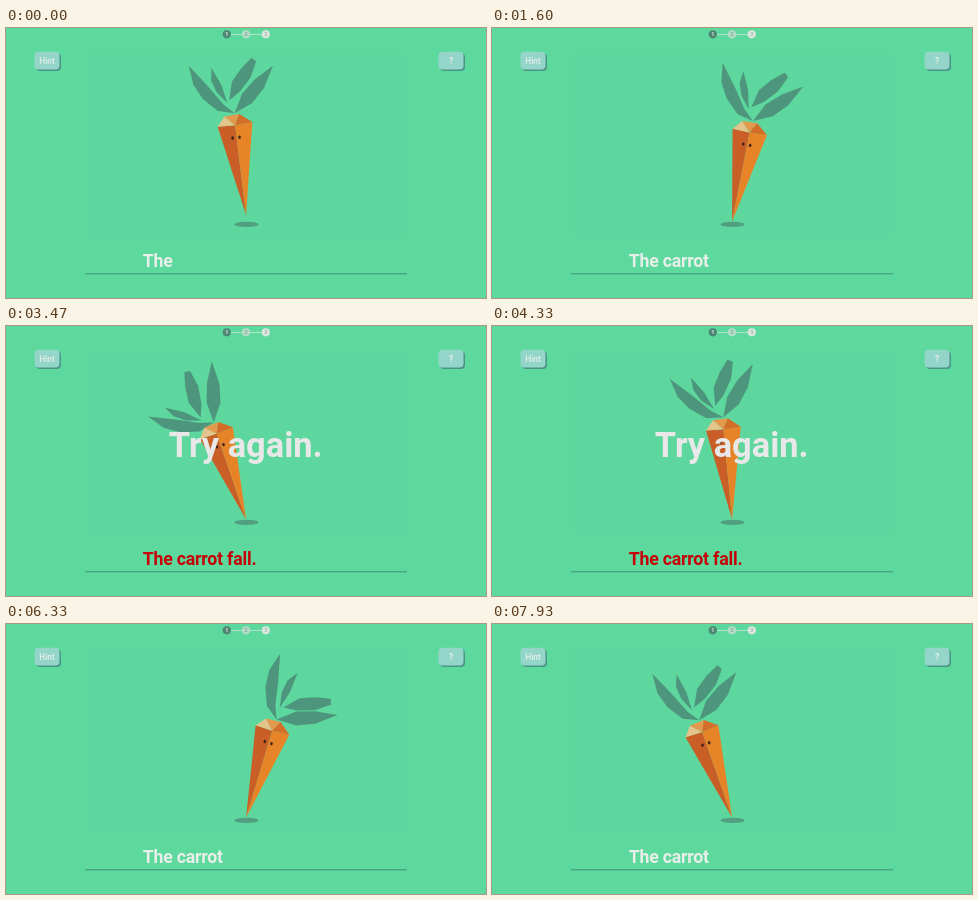
An HTML page that plays this animation: 480x270 px, repeating every 8 s.

```html
<!DOCTYPE html>
<html lang="en">
<head>
<meta charset="utf-8">
<title>Carrot</title>
<style>
  html, body { margin: 0; width: 100%; height: 100%; overflow: hidden; background: #5dd99e; }
  svg { display: block; width: 100%; height: 100%; }
  text { font-family: Roboto, Arial, sans-serif; font-weight: 700; fill: #e8eee9; white-space: pre; }
  .mid { text-anchor: middle; }
  #answer { font-size: 17.7px; letter-spacing: -0.2px; }
</style>
</head>
<body>
<svg viewBox="0 0 480 270">
  <rect x="80" y="24" width="321" height="185" fill="#5dd79d"/>

  <path d="M221 6.5H260" stroke="#b5e0ca"/>
  <g font-size="5.5" class="mid">
    <circle cx="220.8" cy="6.3" r="4.1" fill="#4d8672"/><text x="220.8" y="8.3">1</text>
    <circle cx="240" cy="6.3" r="4.1" fill="#b4dcc8"/><text x="240" y="8.3" style="fill:#82b09c">2</text>
    <circle cx="259.8" cy="6.3" r="4.1" fill="#dbe6df"/><text x="259.8" y="8.3" style="fill:#a5bdb0">3</text>
  </g>

  <g font-size="8.3" class="mid">
    <rect x="30" y="25.3" width="25" height="17.7" rx="4" fill="#4a9585"/>
    <rect x="28.5" y="23.8" width="25" height="17.7" rx="4" fill="#93d5c8"/>
    <text x="41" y="35.8" style="font-weight:500">Hint</text>
    <rect x="434" y="25.3" width="25" height="17.7" rx="4" fill="#4a9585"/>
    <rect x="432.5" y="23.8" width="25" height="17.7" rx="4" fill="#93d5c8"/>
    <text x="445" y="35.8">?</text>
  </g>

  <ellipse cx="240.5" cy="196.4" rx="12" ry="2.7" fill="#4f9f80"/>
  <g id="carrot">
    <g fill="#4d957c">
      <path class="leaf" d="M0 0L-10.5-13-13-32-10-49 0-66-.5-38-2-14Z"/>
      <path class="leaf" d="M-2-12L-6.5-27-6-40 0-51 1-31Z"/>
      <path class="leaf" d="M-9-10.5L-12-29-7.5-44-.5-58 5-56 4.5-39-1.5-22Z"/>
      <path class="leaf" d="M0 0L-6.5-20-5.5-39 0-61 7-38 7.3-19Z"/>
    </g>
    <path d="M-17.5-91L0-90.5 0 0Z" fill="#c95f27"/>
    <path d="M17.5-91.5L0-90.5 0 0Z" fill="#e88428"/>
    <path d="M-17.5-91L-9.5-100.5 0-90.5Z" fill="#e3c58c"/>
    <path d="M-9.5-100.5L5.5-101.2 0-90.5Z" fill="#e39a4c"/>
    <path d="M5.5-101.2L17.5-91.5 0-90.5Z" fill="#d46d27"/>
    <g fill="#42241a">
      <ellipse cx="-4" cy="-78" rx="1.3" ry="1.7"/>
      <ellipse cx="3" cy="-78" rx="1.3" ry="1.7"/>
    </g>
  </g>

  <text id="banner" class="mid" x="239.7" y="131" font-size="34.4" style="fill:#e8e8e8">Try again.</text>
  <text id="answer" x="136.7" y="239.3"></text>
  <path d="M79 245.8H401" stroke="#3f9074"/>
</svg>

<script>
const LOOP = 8000, SWAY = 5090;
const SENTENCE = "The carrot fall.";
const LEAF_ANGLES = [-37, -20, 24.5, 46];
const LEAF_FLEX = [0.97, 1.14, 1.18, 0.96];

// Sway poses: time, body lean, leaf flop, hop height
const poses = [
  [0, -7, 0, 6.4], [300, 3, -14, 4], [800, 16.5, -13, 0], [980, 17.5, 10, 0],
  [1240, 16.8, 24, 0], [1730, 8, -10, 0], [1980, -4, -10, 0], [2230, 5, 14, 0],
  [2400, 5.4, 24, 0], [2710, -14, 13, 0], [2840, -19.3, 11.5, 0], [3470, -19, -30, 0],
  [4000, -2, 0, 0], [4330, -5.5, -12, 0], [4450, -7, -13, 0], [4750, 0, 3, 0]
];

const carrot = document.getElementById("carrot");
const leaves = document.querySelectorAll(".leaf");
const banner = document.getElementById("banner");
const answer = document.getElementById("answer");

const clamp = (v, lo, hi) => Math.min(hi, Math.max(lo, v));

function poseKey(i) {
  const n = poses.length, [time, ...values] = poses[(i + n) % n];
  return [time + Math.floor(i / n) * SWAY, ...values];
}

// Smooth cyclic curve through the poses
function poseAt(time) {
  const i = poses.findLastIndex(p => p[0] <= time);
  const [a, b, c, d] = [-1, 0, 1, 2].map(k => poseKey(i + k));
  const span = c[0] - b[0], u = (time - b[0]) / span;
  return [1, 2, 3].map(k => {
    const m0 = (c[k] - a[k]) / (c[0] - a[0]) * span;
    const m1 = (d[k] - b[k]) / (d[0] - b[0]) * span;
    const rise = c[k] - b[k];
    return b[k] + u * (m0 + u * (3 * rise - 2 * m0 - m1 + u * (m0 + m1 - 2 * rise)));
  });
}

function typedLength(t) {
  const typed = (start, step, max) => clamp(Math.floor((t - start) / step), 0, max);
  return 3 + typed(20, 100, 7) + typed(2620, 100, 6) - typed(5700, 90, 6);
}

function draw(t) {
  const [lean, flop, hop] = poseAt(t % SWAY);
  carrot.setAttribute("transform", `translate(240.1 ${193.4 - Math.max(0, hop)}) rotate(${lean})`);
  leaves.forEach((leaf, i) => {
    const angle = LEAF_ANGLES[i] + flop * LEAF_FLEX[i];
    leaf.setAttribute("transform", `translate(1 -102.5) rotate(${angle})`);
  });

  answer.textContent = SENTENCE.slice(0, typedLength(t));
  answer.style.fill = t >= 3300 && t < 5650 ? "#c60008" : "";
  banner.style.opacity = clamp(Math.min(t - 3300, 5700 - t) / 130, 0, 1);
}

function tick() {
  draw(performance.now() % LOOP);
  requestAnimationFrame(tick);
}
tick();
</script>
</body>
</html>
```
